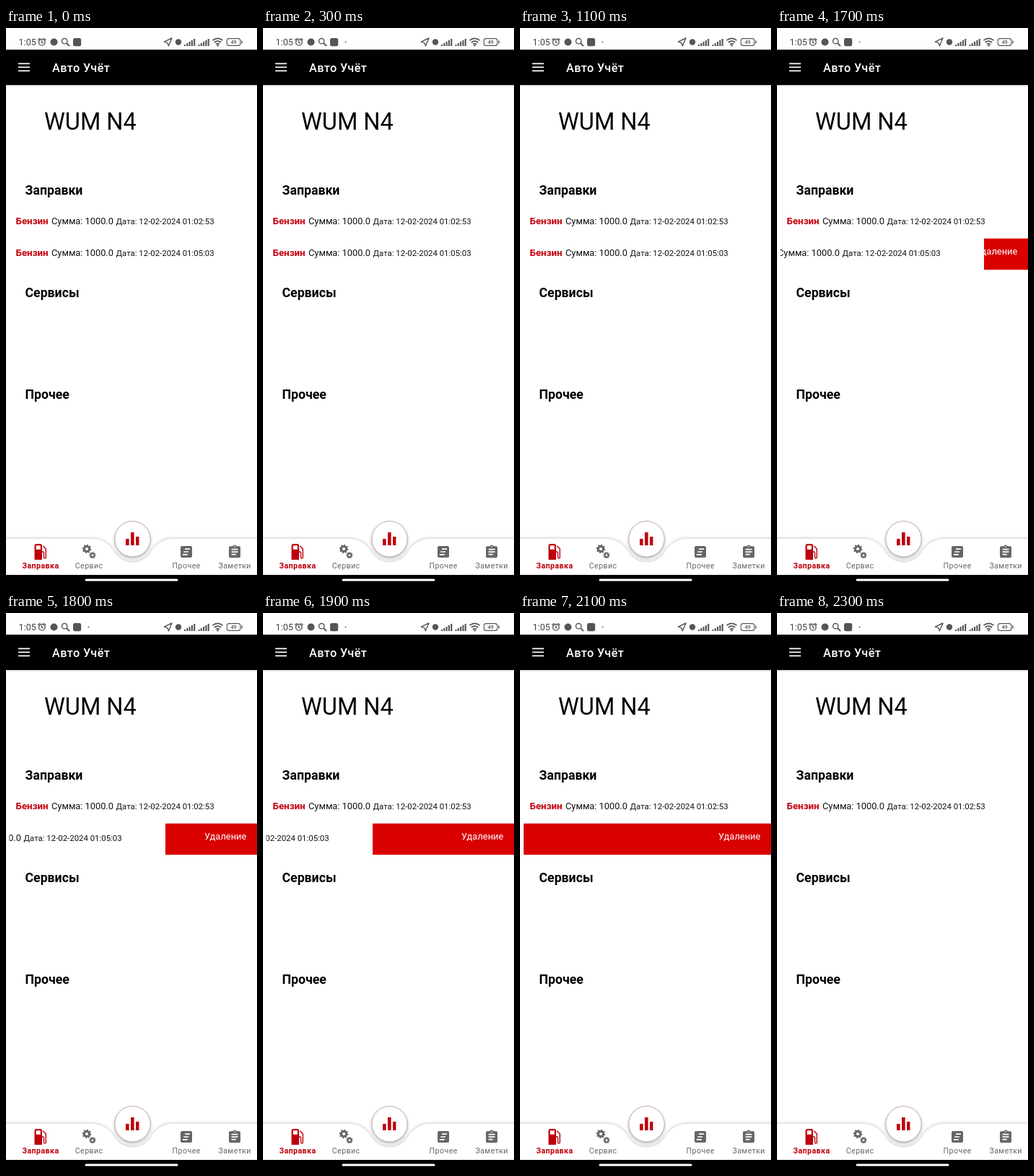
These frames come from a looping animation (348 px wide and 772 px high, 2800 ms). An HTML page:

```html
<!DOCTYPE html>
<html lang="ru">
<head>
<meta charset="utf-8">
<title>Авто Учёт</title>
<style>
  html, body { margin: 0; width: 100%; height: 100%; overflow: hidden; background: #fff; }
  svg { display: block; width: 348px; height: 772px; font-family: Roboto, sans-serif; }
  .heading { font-size: 17.7px; font-weight: 700; }
  .fuel { font-size: 13.3px; font-weight: 700; fill: #c4000c; }
  .sum { font-size: 12.8px; fill: #111; }
  .date { font-size: 11.4px; fill: #111; }
  .tab { font-size: 10.6px; letter-spacing: .44px; text-anchor: middle; fill: #666; }
  .active { font-weight: 700; fill: #bd000c; }
  .line { fill: none; stroke: #555; stroke-width: 1.4; }
</style>
</head>
<body>
<svg viewBox="0 0 348 772">
  <defs>
    <clipPath id="rowClip"><rect x="4.5" y="290" width="344" height="46"/></clipPath>
    <clipPath id="deleteClip"><rect id="reveal" x="349" y="291.5" width="344" height="43.5"/></clipPath>
    <g id="gear" fill="none" stroke="#666">
      <circle r="3.6" stroke-width="3"/>
      <circle r="5.3" stroke-width="2" pathLength="16" stroke-dasharray="1 1"/>
    </g>
    <path id="signal" d="M1 25v-2M4.3 25v-4M7.6 25v-6M10.9 25v-8M14.2 25v-10" stroke="#555" stroke-width="2.1"/>
  </defs>

  <!-- Status bar -->
  <text x="17.5" y="24" font-size="12.6" fill="#444">1:05</text>
  <g class="line">
    <circle cx="49.8" cy="19.8" r="4.3"/>
    <path d="M49.6 17v3l2 1.2M44.2 16.8l3-2.6M55.4 16.8l-3-2.6"/>
    <circle cx="81.2" cy="18.2" r="3.7"/>
    <path d="M84 21l4 4" stroke-width="1.8"/>
    <path d="M219.3 19.2L230 14l-4.6 10.8-1.6-4.2z" stroke-linejoin="round"/>
    <path d="M286.5 17.2q7-5.6 14 0M288.8 20q4.7-3.8 9.4 0M291 22.6q2.5-2 5 0" stroke-width="1.7"/>
    <rect x="306.3" y="14.6" width="18.6" height="9.8" rx="3" stroke-width="1.1"/>
    <path d="M327 17.6v3.8"/>
  </g>
  <g fill="#555">
    <circle cx="66.5" cy="19.5" r="5"/>
    <rect x="93" y="14" width="11.2" height="11.2" rx="2.6"/>
    <circle id="dot" cx="114.5" cy="19.5" r=".9"/>
    <circle cx="239" cy="19.5" r="4.2"/>
    <circle cx="293.5" cy="24.2" r="1.2"/>
    <text x="315.6" y="22.3" font-size="7.4" font-weight="500" text-anchor="middle">49</text>
  </g>
  <use href="#signal" x="247"/>
  <use href="#signal" x="266.5"/>

  <!-- App bar -->
  <rect y="30" width="348" height="49" style="filter:drop-shadow(0 1px 1px #0003)"/>
  <path d="M17 49.3h16M17 54.3h16M17 59.3h16" stroke="#fff" stroke-width="1.8"/>
  <text x="64" y="61.3" font-size="16.2" font-weight="500" letter-spacing=".4" fill="#fff">Авто Учёт</text>

  <!-- Content -->
  <text x="53" y="140.7" font-size="32.5">WUM N4</text>
  <text class="heading" x="26.5" y="231.3">Заправки</text>
  <text class="heading" x="26.5" y="372.8">Сервисы</text>
  <text class="heading" x="26.5" y="514.3">Прочее</text>
  <g>
    <text class="fuel" x="13.6" y="271.7">Бензин</text>
    <text class="sum" x="63" y="271.7">Сумма: 1000.0</text>
    <text class="date" x="152.5" y="271.7">Дата: 12-02-2024 01:02:53</text>
  </g>
  <g id="entry">
    <g clip-path="url(#rowClip)">
      <g id="slide">
        <text class="fuel" x="13.6" y="315.5">Бензин</text>
        <text class="sum" x="63" y="315.5">Сумма: 1000.0</text>
        <text class="date" x="152.5" y="315.5">Дата: 12-02-2024 01:05:03</text>
      </g>
    </g>
    <g clip-path="url(#deleteClip)">
      <rect x="4.5" y="291.5" width="344" height="43.5" fill="#d90000"/>
      <text x="275" y="313.7" font-size="12.9" fill="#fff">Удаление</text>
    </g>
  </g>

  <!-- Bottom navigation -->
  <path d="M-9 708H119C133 708 142 715 148 723C154 734 163 740.5 175.5 740.5S197 734 203 723C209 715 218 708 232 708H357V770H-9z"
        fill="#fff" style="filter:drop-shadow(0 -1px 2px #0003)"/>
  <circle cx="175.5" cy="708.3" r="24.7" fill="#fff" stroke="#b08a90" stroke-width=".7"
          style="filter:drop-shadow(0 2px 2px #0004)"/>
  <path d="M166 717v-9h4.6v9zM173 717v-18h4.6v18zM180 717v-12h4.4v12z" fill="#c2000c"/>

  <g fill="#bd000c">
    <path fill-rule="evenodd" d="M39.5 737V717.5q0-2.5 2.5-2.5h5.5q2.5 0 2.5 2.5V737zM41.7 717.3v5.4h6.1v-5.4z"/>
    <path d="M50 726h1.2q1.3 0 1.3 1.5v6q0 1.6 1.4 1.6t1.4-1.6V722l-4-4.3" fill="none" stroke="#bd000c" stroke-width="1.4"/>
  </g>
  <use href="#gear" x="112" y="722"/>
  <use href="#gear" transform="translate(120 730.7) scale(.72)"/>
  <rect x="242" y="718" width="16" height="16" rx="2" fill="#666"/>
  <path d="M248 722.2h7M246.2 726h6.8M244.8 729.8h7" stroke="#fff" stroke-width="1.7"/>
  <path transform="translate(306.4 715.5) scale(.887)" fill="#666"
        d="M19 3h-4.18C14.4 1.84 13.3 1 12 1s-2.4.84-2.82 2H5c-1.1 0-2 .9-2 2v14c0 1.1.9 2 2 2h14c1.1 0 2-.9 2-2V5c0-1.1-.9-2-2-2zm-7 0c.55 0 1 .45 1 1s-.45 1-1 1-1-.45-1-1 .45-1 1-1zm2 14H7v-2h7v2zm3-4H7v-2h10v2zm0-4H7V7h10v2z"/>
  <text class="tab active" x="48" y="748.8">Заправка</text>
  <text class="tab" x="115.2" y="748.8">Сервис</text>
  <text class="tab" x="250.2" y="748.8">Прочее</text>
  <text class="tab" x="317.2" y="748.8">Заметки</text>

  <rect y="758" width="348" height="14"/>
  <rect x="109.5" y="763.4" width="129" height="3.2" rx="1.6" fill="#fff"/>
</svg>
<script>
  const LOOP = 2800, STEP = 100, SWIPE_START = 1700, ROW_GONE = 2300;
  const el = id => document.getElementById(id);
  const dot = el('dot'), entry = el('entry'), slide = el('slide'), reveal = el('reveal');
  const show = (node, on) => node.setAttribute('visibility', on ? 'visible' : 'hidden');

  // The swipe advances in 100 ms steps, slightly accelerating.
  function swipeOffset(t) {
    if (t < SWIPE_START) return 0;
    const k = Math.min(4, Math.floor((t - SWIPE_START) / STEP));
    return 62 + 64.5 * k + 1.5 * k * k;
  }

  function draw(now) {
    const t = now % LOOP, offset = swipeOffset(t);
    show(dot, t >= STEP);
    show(entry, t < ROW_GONE);
    slide.setAttribute('transform', `translate(${-offset} 0)`);
    reveal.setAttribute('x', 349 - offset);
  }

  const start = performance.now();
  function tick() {
    draw(performance.now() - start);
    requestAnimationFrame(tick);
  }
  tick();
</script>
</body>
</html>
```
